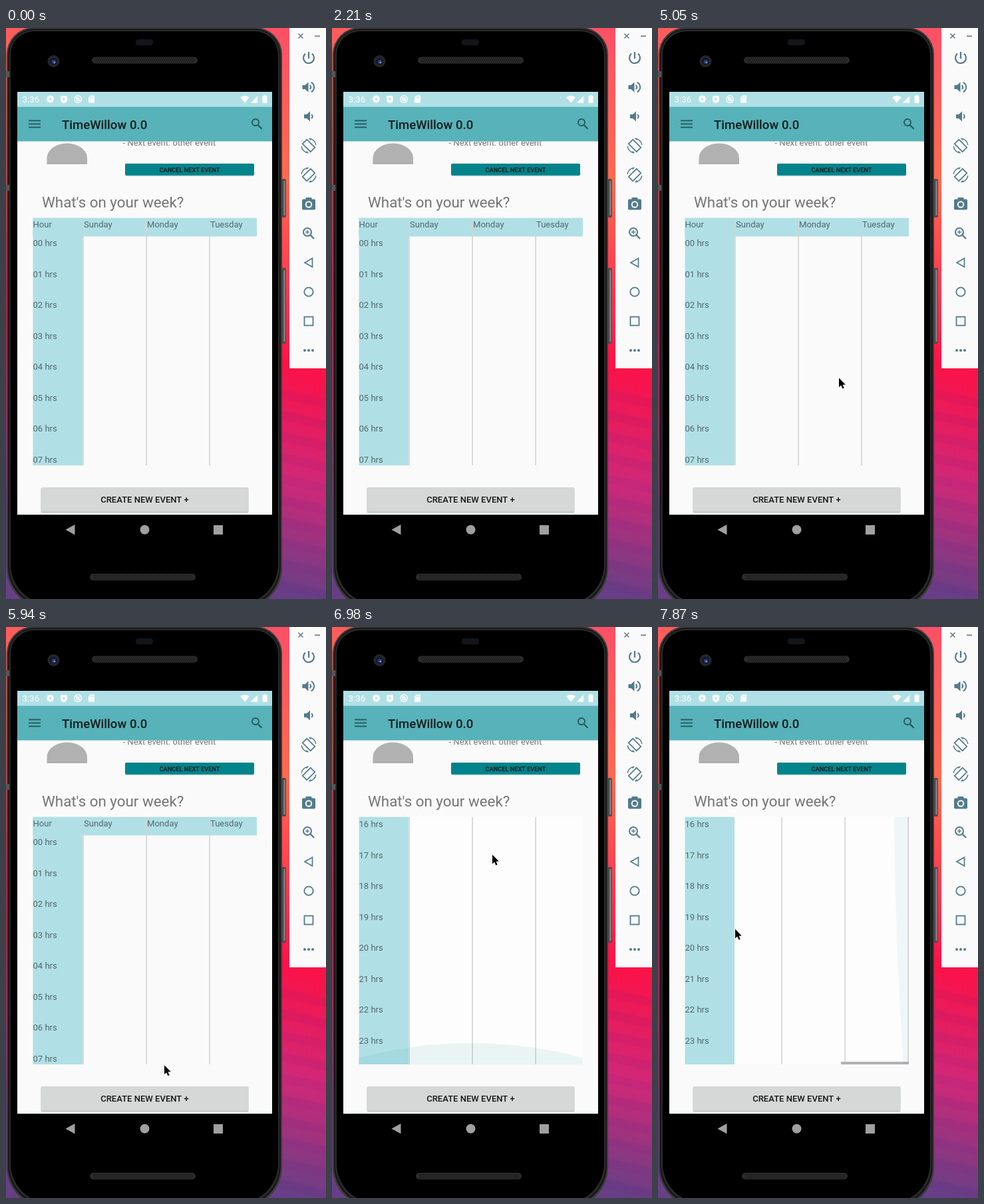
An HTML page with a canvas for the animation above (8000 ms loop, 481x859 px).

```html
<!DOCTYPE html>
<html lang="en">
<head>
<meta charset="utf-8">
<title>Week planner</title>
<style>
html, body { margin: 0; width: 100%; height: 100%; overflow: hidden; background: #000; }
canvas { display: block; width: 481px; height: 859px; }
</style>
</head>
<body>
<canvas id="stage"></canvas>
<script>
const W = 481, H = 859, LOOP = 8000;
const canvas = document.getElementById('stage');
const scale = window.devicePixelRatio || 1;
canvas.width = W * scale;
canvas.height = H * scale;
const ctx = canvas.getContext('2d');

const SKY = '#b0e0e6', PAPER = '#fafafa', SLATE = '#527b8b';
const MUTED = 'rgba(0,0,0,.54)', RULE = '#d2d3d3';
const TABLE = { x: 40, y: 285.5, right: 377, bottom: 658, days: 116 };
const ROW = 46.5, COL = 95;
const DAYS = ['Sunday', 'Monday', 'Tuesday', 'Wednesday', 'Thursday', 'Friday', 'Saturday'];

// The screen refreshes in ticks; all motion below is timed in them.
const TICK = 148.5, TICK_LEAD = 18;
const SWIPE_UP = { from: 41, to: 47, distance: 771 };
const SWIPE_LEFT = { from: 48, to: 53, distance: 405 };

// Each pointer visit glides through a few key points: [tick, x, y].
const VISITS = [
  [[4, 317, 655], [9, 282, 502], [11, 289, 450], [14, 408, 242]],
  [[24, 381, 695], [30, 288, 604], [32, 261, 486], [34, 272, 526], [38, 232, 700],
    [41, 241, 638], [43, 241, 551], [46, 241, 342], [48, 241, 342], [51, 16, 463], [53, 116, 454]]
];

function fill(x, y, w, h, color) {
  ctx.fillStyle = color;
  ctx.fillRect(x, y, w, h);
}

function rounded(x, y, w, h, r, color) {
  ctx.beginPath();
  ctx.roundRect(x, y, w, h, r);
  ctx.fillStyle = color;
  ctx.fill();
}

function disc(x, y, r, color) {
  ctx.beginPath();
  ctx.arc(x, y, r, 0, Math.PI * 2);
  ctx.fillStyle = color;
  ctx.fill();
}

function ring(x, y, r, color, width, a = 0, b = Math.PI * 2) {
  ctx.beginPath();
  ctx.arc(x, y, r, a, b);
  ctx.lineWidth = width;
  ctx.strokeStyle = color;
  ctx.stroke();
}

function trace(points, closed) {
  ctx.beginPath();
  points.forEach(([x, y]) => ctx.lineTo(x, y));
  if (closed) ctx.closePath();
}

function poly(points, color) {
  trace(points, true);
  ctx.fillStyle = color;
  ctx.fill();
}

function line(points, color, width, closed = false) {
  trace(points, closed);
  ctx.lineWidth = width;
  ctx.strokeStyle = color;
  ctx.stroke();
}

function text(str, x, y, size, color, weight = 400, align = 'left') {
  ctx.font = `${weight} ${size}px Roboto, sans-serif`;
  ctx.textAlign = align;
  ctx.fillStyle = color;
  ctx.fillText(str, x, y);
}

function at(x, y, draw, angle = 0) {
  ctx.save();
  ctx.translate(x, y);
  ctx.rotate(angle);
  draw();
  ctx.restore();
}

function clipped(x, y, w, h, draw) {
  ctx.save();
  ctx.beginPath();
  ctx.rect(x, y, w, h);
  ctx.clip();
  draw();
  ctx.restore();
}

function drawWallpaper() {
  const g = ctx.createLinearGradient(450, 0, 250, 808);
  [[0, '#fb4f66'], [.27, '#ff6a50'], [.48, '#ff3450'], [.6, '#fb1248'], [.8, '#cf2878'], [1, '#683f86']]
    .forEach(([stop, color]) => g.addColorStop(stop, color));
  fill(0, 0, W, H, g);
  for (let y = 540; y < H; y += 32)
    poly([[400, y], [W, y + 18], [W, y + 32], [400, y + 14]], 'rgba(60,30,130,.06)');
}

function speaker(x, y) {
  rounded(x, y, 159, 10, 5, '#2b2b2b');
  for (let row = 0; row < 3; row++)
    for (let i = 0; i < 50; i++) fill(x + 5 + i * 3 + row % 2 * 1.5, y + 2 + row * 2.5, 1.4, 1.2, '#111');
}

function drawPhone() {
  [[227, 58], [361, 114]].forEach(([y, h]) => {
    rounded(414, y, 7, h, 2, '#4d4d4d');
    fill(417.5, y + 3, 2, h - 6, '#8a8a8a');
  });
  ['#3c3c3c', '#181818', '#2a2a2a', '#000'].forEach((color, i) => {
    const inset = 1 + i * 2;
    rounded(inset, inset - 2, 416 - inset * 2, 876 - inset * 2, [42 - inset, 42 - inset, 60, 60], color);
  });
  [65, 236].forEach(y => fill(0, y, 5, 9, '#555'));
  rounded(195, 17, 26, 9, 4, '#14151a');
  speaker(129, 43.5);
  speaker(126, 821);
  disc(71.5, 50, 9, '#24262b');
  disc(71.5, 50, 5.5, '#15192b');
  disc(72, 51, 2.8, '#304b92');
  disc(73, 52, 1.1, '#8fa6dc');
}

function drawStatusBar() {
  const white = '#fff';
  fill(17, 96, 383, 22.5, SKY);
  text('3:36', 24.5, 112, 13.3, white);
  at(66.5, 107, () => {
    for (let i = 0; i < 8; i++) at(0, 0, () => fill(-1.4, -5.5, 2.8, 3, white), i * Math.PI / 4);
    ring(0, 0, 3, white, 2.4);
  });
  rounded(82, 102, 10, 11, [2, 2, 5, 5], white);
  poly([[85.5, 104.5], [89.5, 107], [85.5, 109.5]], SKY);
  ring(108, 107, 5.2, white, 1.4);
  ring(108, 107, 2.2, white, 1.3);
  line([[104.5, 103.5], [111.5, 110.5]], white, 1.3);
  poly([[127, 101.5], [133, 101.5], [133, 112.5], [124, 112.5], [124, 104.5]], white);
  for (let x = 126.5; x < 132; x += 2) fill(x, 103, 1, 2.5, SKY);
  ctx.beginPath();
  ctx.moveTo(359, 112.5);
  ctx.arc(359, 112.5, 10.8, -2.27, -.87);
  ctx.fillStyle = white;
  ctx.fill();
  poly([[368, 112.5], [379, 112.5], [379, 101.5]], 'rgba(255,255,255,.5)');
  poly([[368, 112.5], [377, 112.5], [377, 103.5]], white);
  rounded(385.5, 102, 7, 11, 1, white);
  fill(387.5, 100.8, 3, 2, white);
}

function drawToolbar() {
  const ink = '#24575c';
  fill(17, 118.5, 383, 52, '#57b2b9');
  for (let y = 138.5; y < 150; y += 5) fill(34, y, 18, 1.8, ink);
  text('TimeWillow 0.0', 84, 151.5, 18.6, '#101b1c', 500);
  ring(375, 142, 5, ink, 1.9);
  line([[378.5, 145.7], [384.5, 151.7]], ink, 2.2);
}

function drawNavigation() {
  const gray = '#a0a0a0';
  poly([[89.5, 754.8], [103.5, 747], [103.5, 762.5]], gray);
  disc(208.5, 754.8, 7, gray);
  fill(312, 748, 14, 14, gray);
}

function drawScreen() {
  fill(17, 96, 383, 636, PAPER);
  fill(17, 732, 383, 1, '#27423a');
  clipped(17, 170.5, 383, 561.5, () => {
    text('- Next event: other event', 175.5, 177, 13.05, '#757575');
    const shoulder = { x: 30, y: 22 };
    rounded(61.5, 173.5, 60.5, 31, [shoulder, shoulder, 0, 0], '#b1b1b1');
    fill(61.5, 203.5, 60.5, 1, '#9d9d9d');
    rounded(179, 204.5, 194, 18, 2, '#69a9ae');
    rounded(179, 204, 194, 17.5, 2, '#03838b');
    text('CANCEL NEXT EVENT', 276, 217.3, 9.2, '#071315', 500, 'center');
    text("What's on your week?", 54, 270, 22.35, '#757575');
    rounded(52.5, 692, 312, 37.5, 2, '#c4c5c5');
    rounded(52.5, 691, 312, 36.5, 2, '#d6d7d7');
    text('CREATE NEW EVENT +', 208.5, 714.3, 13.05, '#151515', 500, 'center');
  });
  drawStatusBar();
  drawToolbar();
  drawNavigation();
}

function rotateIcon(y, side) {
  at(455, y, () => {
    ctx.scale(side, 1);
    at(0, 0, () => {
      ctx.lineWidth = 1.7;
      ctx.strokeStyle = SLATE;
      ctx.strokeRect(-4.6, -8.5, 9.2, 17);
    }, -Math.PI / 4);
    [0, Math.PI].forEach(turn => at(0, 0, () => {
      ring(0, 0, 10.8, SLATE, 1.5, -1.5, -.1);
      poly([[-.5, -11.5], [4.2, -9.6], [3, -8]], SLATE);
    }, turn));
  });
}

function speakerIcon(x, y, waves) {
  poly([[x, y - 3], [x + 4, y - 3], [x + 9, y - 7.5], [x + 9, y + 7.5], [x + 4, y + 3], [x, y + 3]], SLATE);
  for (let i = 0; i < waves; i++) ring(x + 9.5, y, 3.2 + i * 5, SLATE, 2, -1.1, 1.1);
}

function drawSidebar() {
  const x = 455, chrome = '#62757e';
  fill(426, 0, 55, 512, PAPER);
  line([[439.5, 8.5], [446.5, 15.5]], chrome, 1.5);
  line([[446.5, 8.5], [439.5, 15.5]], chrome, 1.5);
  fill(464, 11.5, 8, 1.5, chrome);
  ring(x, 45, 8, SLATE, 2.2, -.9, Math.PI + .9);
  fill(x - 1.1, 36, 2.2, 10, SLATE);
  speakerIcon(445.5, 89, 2);
  speakerIcon(448, 133, 1);
  rotateIcon(177, 1);
  rotateIcon(221, -1);
  rounded(445, 257.5, 20, 16, 2, SLATE);
  rounded(450.5, 255, 9, 5, 1, SLATE);
  disc(x, 265.5, 5.2, PAPER);
  disc(x, 265.5, 3.2, SLATE);
  ring(453, 307, 6, SLATE, 2);
  line([[457, 311], [463, 317]], SLATE, 2.4);
  fill(450, 306.3, 6, 1.4, SLATE);
  fill(452.3, 304, 1.4, 6, SLATE);
  line([[449, 353], [460.5, 346.5], [460.5, 359.5]], SLATE, 1.7, true);
  ring(x, 397, 6.7, SLATE, 1.8);
  ctx.strokeRect(448.5, 434.5, 13, 13);
  for (let i = -1; i <= 1; i++) disc(x + i * 6, 485, 2, SLATE);
}

function drawTable(v, h) {
  const { x, y, right, bottom, days } = TABLE;
  const width = right - x, height = bottom - y;
  clipped(x, y, width, height, () => {
    if (v) fill(x, y, width, height, '#fdfdfd');
    fill(x + .5, y - v, width, 28, SKY);
    fill(x + .5, y, days - x - 1.5, height, SKY);
    text('Hour', x + .5, 300 - v, 13.05, MUTED);
    for (let hour = 0; hour < 24; hour++)
      text(String(hour).padStart(2, '0') + ' hrs', x + .5, 328 + hour * ROW - v, 13.05, MUTED);
  });
  clipped(days - 1, y, right - days + 1, height, () => {
    DAYS.forEach((day, i) => text(day, days + 1 + i * COL - h, 300 - v, 13.05, MUTED));
    for (let i = 0; i <= DAYS.length; i++) fill(days - .7 + i * COL - h, y, 1.6, height, RULE);
    if (h) {
      const view = right - days, total = COL * DAYS.length;
      fill(days + h / total * view, 654, view * view / total, 4, '#b2b2b2');
    }
  });
}

function drawGlow(atBottom) {
  const { x, y, right, bottom } = TABLE;
  clipped(x, y, right - x, bottom - y, () => {
    ctx.beginPath();
    if (atBottom) {
      ctx.moveTo(x, 648);
      ctx.quadraticCurveTo(208, 604, right, 648);
      ctx.lineTo(right, bottom);
      ctx.lineTo(x, bottom);
    } else {
      ctx.moveTo(355, y);
      ctx.quadraticCurveTo(356, 470, 369, bottom);
      ctx.lineTo(right, bottom);
      ctx.lineTo(right, y);
    }
    ctx.fillStyle = `rgba(3,131,139,${atBottom ? .075 : .055})`;
    ctx.fill();
  });
}

function drawPointer([x, y]) {
  at(x, y + .6, () => {
    const arrow = [[0, 0], [0, 13.8], [3.2, 10.9], [5.4, 16], [7.7, 15], [5.5, 10.1], [9.8, 9.8]];
    ctx.lineJoin = 'round';
    line(arrow, '#fff', 2, true);
    poly(arrow, '#000');
  });
}

function progress({ from, to }, tick) {
  return Math.min(1, Math.max(0, (tick - from) / (to - from)));
}

function pointerAt(tick) {
  const keys = VISITS.find(visit => tick >= visit[0][0] && tick <= visit.at(-1)[0]);
  if (!keys) return null;
  const next = Math.max(1, keys.findIndex(key => key[0] >= tick));
  const [from, x0, y0] = keys[next - 1], [to, x1, y1] = keys[next];
  const p = progress({ from, to }, tick);
  return [x0 + (x1 - x0) * p, y0 + (y1 - y0) * p];
}

function render(t) {
  const tick = Math.floor((t + TICK_LEAD) / TICK);
  const v = SWIPE_UP.distance * progress(SWIPE_UP, tick) ** 2.09;
  const h = SWIPE_LEFT.distance * (1 - (1 - progress(SWIPE_LEFT, tick)) ** 1.7);
  const pointer = pointerAt(tick);
  ctx.setTransform(scale, 0, 0, scale, 0, 0);
  drawWallpaper();
  drawPhone();
  drawScreen();
  drawTable(v, h);
  if (tick === SWIPE_UP.to) drawGlow(true);
  if (tick === SWIPE_LEFT.to) drawGlow(false);
  drawSidebar();
  if (pointer) drawPointer(pointer);
}

const start = performance.now();
function tickFrame() {
  render((performance.now() - start) % LOOP);
  requestAnimationFrame(tickFrame);
}
tickFrame();
</script>
</body>
</html>
```
